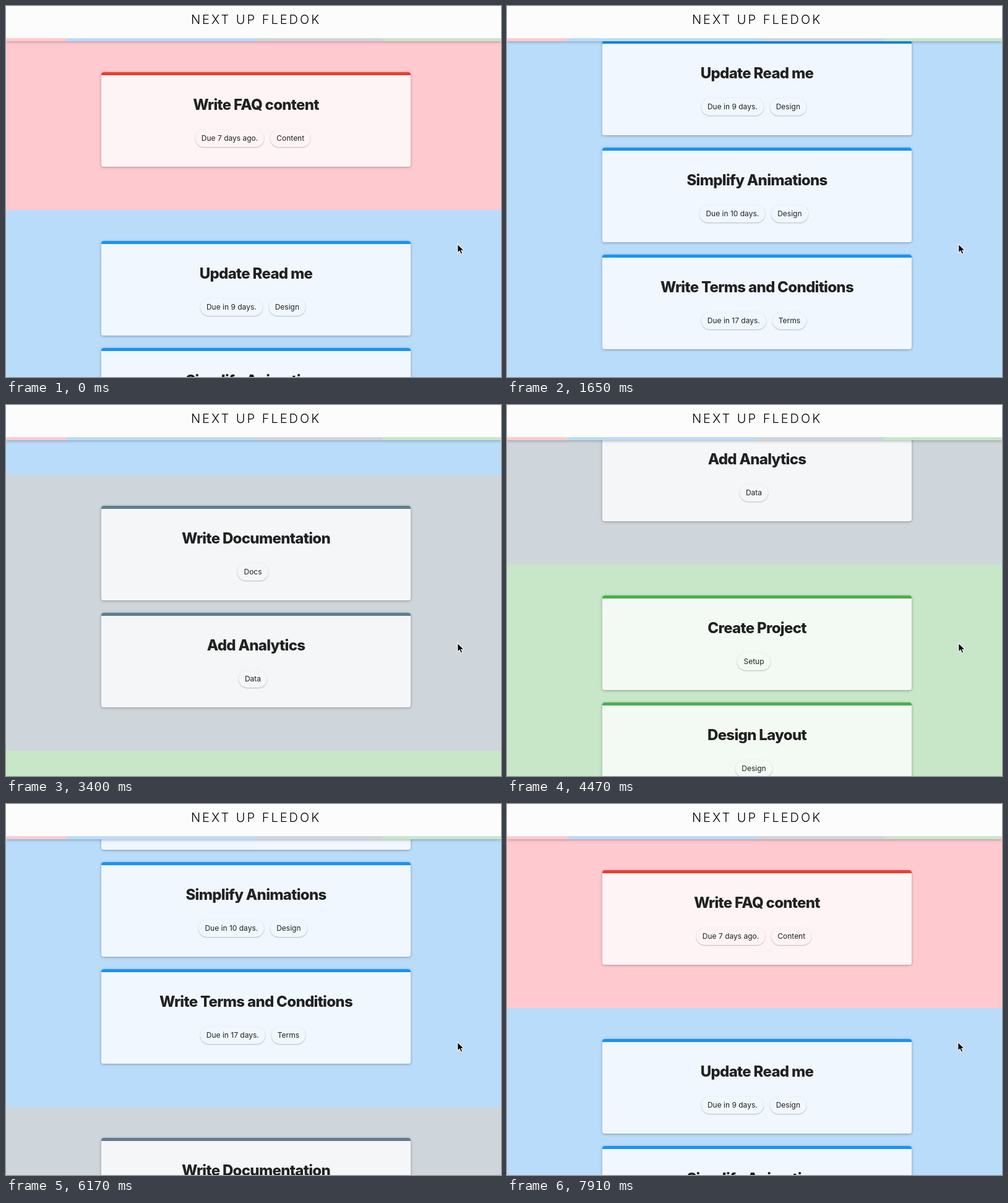
These frames come from a looping animation (800 by 600 pixels, 8000 ms). An HTML page:

```html
<!DOCTYPE html>
<html lang="en">
<head>
<meta charset="utf-8">
<title>Next Up Fledok</title>
<style>
  html, body { margin: 0; width: 100%; height: 100%; overflow: hidden; }
  body { position: relative; background: #c8e7c9; color: #212121; font-family: Inter, "Open Sans", sans-serif; }
  #stage { position: absolute; left: 0; top: 0; width: 800px; height: 600px; overflow: hidden; }
  header { position: absolute; left: 0; top: 0; width: 800px; height: 57px; background: #fcfcfc;
    box-shadow: 0 1px 5px rgba(0, 0, 0, .3); }
  h1 { position: absolute; left: 4px; top: 2px; width: 800px; margin: 0; text-align: center;
    font-size: 20px; font-weight: 300; line-height: 40px; letter-spacing: 3px; color: #000; }
  #strip { position: absolute; left: -4.6px; top: 52px; width: 817.6px; height: 5px; display: flex; }
  #page { position: absolute; left: 0; top: 57px; width: 800px; will-change: transform; }
  section { padding: 50px 0; background: var(--back); }
  article { position: relative; box-sizing: border-box; width: 500px; height: 153px; margin: 0 0 20px 154px;
    border-radius: 4px; overflow: hidden; background: var(--card); }
  .lift { width: 500px; height: 153px; margin: 0 0 20px 154px; border-radius: 4px;
    box-shadow: 0 1px 5px rgba(0, 0, 0, .24), 0 1px 2px rgba(0, 0, 0, .1); }
  .lift article { margin: 0; }
  article::before { content: ""; position: absolute; left: 0; top: 0; width: 500px; height: 5px; background: var(--edge); }
  h2 { position: absolute; left: 0; top: 33px; width: 500px; margin: 0; text-align: center;
    font-size: 24px; font-weight: 800; line-height: 40px; letter-spacing: -.7px; }
  .tags { position: absolute; left: 0; top: 93px; width: 500px; display: flex; justify-content: center; }
  .tags span { margin-right: 10px; padding: 0 10px; border-radius: 14px; font-size: 12px; line-height: 28px;
    white-space: nowrap; background: var(--card); box-shadow: 0 1px 2px rgba(0, 0, 0, .24), 0 0 1px rgba(0, 0, 0, .08); }
  svg { position: absolute; left: 0; top: 0; }
</style>
</head>
<body>
<div id="stage">
  <div id="page"></div>
  <header><h1>NEXT UP FLEDOK</h1><div id="strip"></div></header>
  <svg width="800" height="600">
    <g id="cursor">
      <path d="M0 0V14.2L3.2 11.2L5.4 16.2L8 15L5.9 10.2H10.2Z" transform="translate(.4 1)" fill="#000" opacity=".2"/>
      <path d="M0 0V14.2L3.2 11.2L5.4 16.2L8 15L5.9 10.2H10.2Z" fill="#000" stroke="#fff" stroke-width="1.1"/>
    </g>
  </svg>
</div>
<script>
const LOOP = 8000;

const groups = [
  { back: "#ffcacf", card: "#fef4f5", edge: "#f03c30", cards: [
    ["Write FAQ content", "Due 7 days ago.", "Content"]] },
  { back: "#badcfb", card: "#f0f7fe", edge: "#1a93f6", cards: [
    ["Update Read me", "Due in 9 days.", "Design"],
    ["Simplify Animations", "Due in 10 days.", "Design"],
    ["Write Terms and Conditions", "Due in 17 days.", "Terms"]] },
  { back: "#ced6dc", card: "#f5f6f8", edge: "#5f7d8d", cards: [
    ["Write Documentation", "Docs"],
    ["Add Analytics", "Data"]] },
  { back: "#c8e7c9", card: "#f3faf4", edge: "#4caf50", cards: [
    ["Create Project", "Setup"],
    ["Design Layout", "Design"]] }
];

// Scroll position over time: a steady way down, a slowing way back up
const path = [[480, 0], [950, 137], [2360, 531], [3400, 836], [4560, 1165],
  [4850, 1165], [5510, 782], [6700, 190], [7200, 0]];

// Bursts of screen updates: start, end, count
const bursts = [[600, 1300, 7], [1420, 2120, 8], [2240, 2940, 7], [3050, 3750, 7],
  [3870, 4560, 8], [4950, 5690, 9], [5780, 6350, 7], [6500, 7200, 8]];

const ticks = bursts.flatMap(([start, end, count]) =>
  Array.from({ length: count }, (_, i) =>
    Math.round((start + (end - start) * i / (count - 1)) / 10) * 10));

const page = document.getElementById("page");
const strip = document.getElementById("strip");
const cursor = document.getElementById("cursor");

function cardHtml([title, ...tags]) {
  const chips = tags.map(tag => `<span>${tag}</span>`).join("");
  return `<div class="lift"><article><h2>${title}</h2><div class="tags">${chips}</div></article></div>`;
}

page.innerHTML = groups.map(g =>
  `<section style="--back:${g.back};--card:${g.card};--edge:${g.edge}">${g.cards.map(cardHtml).join("")}</section>`).join("");
strip.innerHTML = groups.map(g =>
  `<div style="flex:${g.cards.length};background:${g.back}"></div>`).join("");

function scrollAt(t) {
  const i = path.findIndex(([time]) => time > t);
  if (i < 1) return 0;
  const [t0, y0] = path[i - 1], [t1, y1] = path[i];
  return Math.round(y0 + (y1 - y0) * (t - t0) / (t1 - t0));
}

function draw(t) {
  const tick = ticks.reduce((last, time) => time <= t ? time : last, 0);
  page.style.transform = `translateY(${-scrollAt(tick)}px)`;
  cursor.setAttribute("transform", `translate(${t < 7910 ? 729.8 : 728.8} 385)`);
}

const begin = performance.now();
function frame() {
  draw((performance.now() - begin) % LOOP);
  requestAnimationFrame(frame);
}
frame();
</script>
</body>
</html>
```
